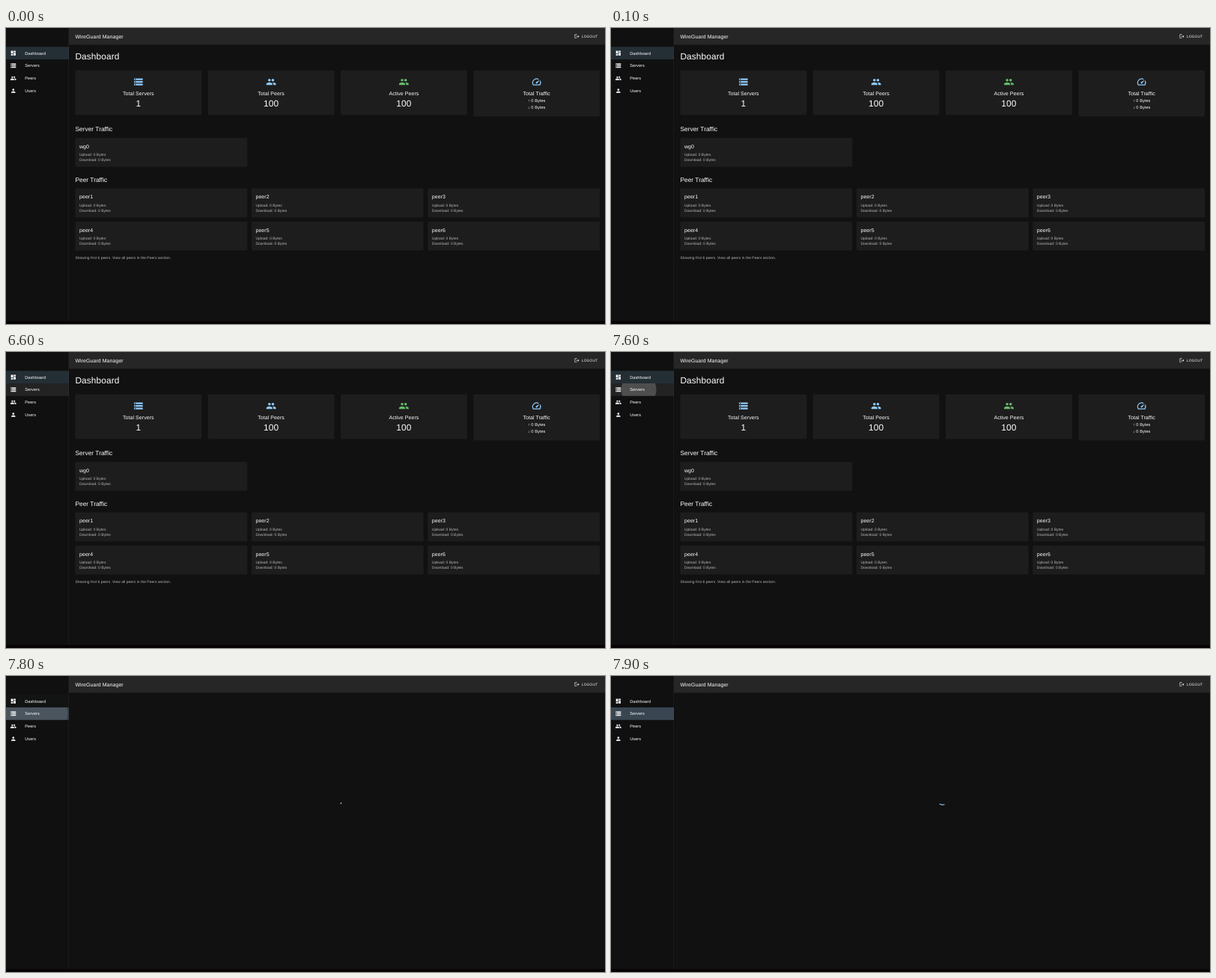
Animation, 800 px wide and 396 px high, one loop 8 s. Source, as an HTML page:

```html
<!DOCTYPE html>
<html lang="en">
<head>
<meta charset="utf-8">
<title>WireGuard Manager</title>
<style>
  html, body { margin: 0; width: 100%; height: 100%; overflow: hidden; background: #111; }
  svg { display: block; width: 800px; height: 396px; }
  text { font-family: "Liberation Sans", Arial, sans-serif; fill: #fff; white-space: pre; text-rendering: geometricPrecision; }
</style>
</head>
<body>
<svg id="stage" viewBox="0 0 800 396" xmlns="http://www.w3.org/2000/svg"></svg>
<script>
const NS = 'http://www.w3.org/2000/svg';
const LOOP = 8000, STEP = 100;
const BLUE = '#90caf9', GREEN = '#66bb6a';
const LEFT = 264, WIDTH = 2002;

const ICONS = {
  dashboard: 'M3 13h8V3H3v10zm0 8h8v-6H3v6zm10 0h8V11h-8v10zm0-18v6h8V3h-8z',
  storage: 'M2 20h20v-4H2v4zm2-3h2v2H4v-2zM2 4v4h20V4H2zm4 3H4V5h2v2zm-4 7h20v-4H2v4zm2-3h2v2H4v-2z',
  people: 'M16 11c1.66 0 2.99-1.34 2.99-3S17.66 5 16 5c-1.66 0-3 1.34-3 3s1.34 3 3 3zm-8 0c1.66 0 2.99-1.34 2.99-3S9.66 5 8 5C6.34 5 5 6.34 5 8s1.34 3 3 3zm0 2c-2.33 0-7 1.17-7 3.5V19h14v-2.5c0-2.33-4.67-3.5-7-3.5zm8 0c-.29 0-.62.02-.97.05 1.16.84 1.97 1.97 1.97 3.45V19h6v-2.5c0-2.33-4.67-3.5-7-3.5z',
  person: 'M12 12c2.21 0 4-1.79 4-4s-1.79-4-4-4-4 1.79-4 4 1.79 4 4 4zm0 2c-2.67 0-8 1.34-8 4v2h16v-2c0-2.66-5.33-4-8-4z',
  speed: 'm20.38 8.57-1.23 1.85a8 8 0 0 1-.22 7.58H5.07A8 8 0 0 1 15.58 6.85l1.85-1.23A10 10 0 0 0 3.35 19a2 2 0 0 0 1.72 1h13.85a2 2 0 0 0 1.74-1 10 10 0 0 0-.27-10.44zm-9.79 6.84a2 2 0 0 0 2.83 0l5.66-8.49-8.49 5.66a2 2 0 0 0 0 2.83z',
  logout: 'm17 7-1.41 1.41L18.17 11H8v2h10.17l-2.58 2.58L17 17l5-5zM4 5h8V3H4c-1.1 0-2 .9-2 2v14c0 1.1.9 2 2 2h8v-2H4z'
};

// font size and letter spacing (em)
const STYLES = {
  h4: [34, .00735], h5: [24, 0], h6: [20, .0075],
  body1: [16, .00938], body2: [14, .01071], button: [14, .02857]
};

function el(parent, tag, attrs) {
  const node = document.createElementNS(NS, tag);
  for (const key in attrs) node.setAttribute(key, attrs[key]);
  return parent.appendChild(node);
}
const rect = (parent, x, y, width, height, fill, rx = 0) =>
  el(parent, 'rect', { x, y, width, height, fill, rx });

// y is the middle of the text line
function text(parent, str, x, y, style, anchor = 'start', opacity = 1) {
  const [size, spacing] = STYLES[style];
  el(parent, 'text', {
    x, y: y + size * .3465, 'font-size': size, 'letter-spacing': size * spacing,
    'text-anchor': anchor, 'fill-opacity': opacity
  }).textContent = str;
}
function icon(parent, name, x, y, size, fill) {
  el(parent, 'path', { d: ICONS[name], fill, transform: `translate(${x} ${y}) scale(${size / 24})` });
}

const svg = document.getElementById('stage');
rect(svg, 0, 0, 800, 396, '#111');
const page = el(svg, 'g', { transform: 'scale(.35)' });

// top bar
rect(page, 240, 0, 2060, 64, '#262626');
text(page, 'WireGuard Manager', 264, 32, 'h6');
icon(page, 'logout', 2168.5, 22, 20, '#fff');
text(page, 'LOGOUT', 2196.5, 32, 'button');

// sidebar
rect(page, 0, 0, 240, 1132, '#101010');
rect(page, 239, 0, 1, 1132, 'rgba(255,255,255,.12)');
const clip = el(el(svg, 'defs', {}), 'clipPath', { id: 'row' });
rect(clip, 0, 120, 240, 48, '#fff');
const MENU = [['Dashboard', 'dashboard'], ['Servers', 'storage'], ['Peers', 'people'], ['Users', 'person']];
const rows = MENU.map(([label, name], i) => {
  const y = 72 + 48 * i;
  const back = rect(page, 0, y, 240, 48, 'none');
  icon(page, name, 16, y + 12, 24, '#fff');
  text(page, label, 72, y + 24, 'body1');
  return back;
});
const rippleBox = el(page, 'g', { 'clip-path': 'url(#row)' });
const ripple = el(rippleBox, 'circle', { cx: 106, cy: 144, fill: '#fff' });
rows[1].after(rippleBox);

// dashboard content
const main = el(page, 'g', {});
text(main, 'Dashboard', LEFT, 109, 'h4');

const statPitch = (WIDTH + 24) / 4, statWidth = statPitch - 24;
[
  ['storage', BLUE, 'Total Servers', '1'],
  ['people', BLUE, 'Total Peers', '100'],
  ['people', GREEN, 'Active Peers', '100'],
  ['speed', BLUE, 'Total Traffic', null]
].forEach(([name, color, label, value], i) => {
  const x = LEFT + i * statPitch, mid = x + statWidth / 2;
  rect(main, x, 162, statWidth, value ? 170 : 176, '#1d1d1d', 4);
  icon(main, name, mid - 20, 186, 40, color);
  text(main, label, mid, 250, 'h6', 'middle');
  if (value) text(main, value, mid, 287, 'h4', 'middle');
  else ['↑', '↓'].forEach((arrow, n) => text(main, arrow + ' 0 Bytes', mid, 278 + 24 * n, 'body1', 'middle'));
});

const cardPitch = (WIDTH + 16) / 3;
function trafficCard(name, col, y) {
  const x = LEFT + col * cardPitch;
  rect(main, x, y, cardPitch - 16, 111, '#1d1d1d', 4);
  text(main, name, x + 16, y + 32, 'h6');
  text(main, 'Upload: 0 Bytes', x + 16, y + 65, 'body2', 'start', .7);
  text(main, 'Download: 0 Bytes', x + 16, y + 85, 'body2', 'start', .7);
}
text(main, 'Server Traffic', LEFT, 386, 'h5');
trafficCard('wg0', 0, 420);
text(main, 'Peer Traffic', LEFT, 579, 'h5');
for (let i = 0; i < 6; i++) trafficCard('peer' + (i + 1), i % 3, 613 + 127 * Math.floor(i / 3));
text(main, 'Showing first 6 peers. View all peers in the Peers section.', LEFT, 877, 'body2', 'start', .7);

// loading spinner
const spinner = el(page, 'circle', {
  r: 20.2, fill: 'none', stroke: BLUE, 'stroke-width': 3.6
});

rect(svg, 0, 392, 800, 4, '#080305');

function bezier(x1, y1, x2, y2) {
  const at = (a, b, s) => 3 * a * s * (1 - s) ** 2 + 3 * b * s * s * (1 - s) + s ** 3;
  return x => {
    if (x <= 0) return 0;
    if (x >= 1) return 1;
    let lo = 0, hi = 1;
    for (let i = 0; i < 24; i++) {
      const s = (lo + hi) / 2;
      if (at(x1, x2, s) < x) lo = s; else hi = s;
    }
    return at(y1, y2, lo);
  };
}
const standard = bezier(.4, 0, .2, 1);
const easeInOut = bezier(.42, 0, .58, 1);

const PRESS = 7410, RELEASE = 7600, SWITCH = 7700, SPIN = 7680;
const white = a => `rgba(255,255,255,${a})`;
const blue = a => `rgba(144,202,249,${a})`;

function draw(t) {
  const loading = t >= SWITCH;
  main.setAttribute('display', loading ? 'none' : 'inline');

  // menu backgrounds
  const k = standard((t - SWITCH) / 150);
  rows[0].setAttribute('fill', blue(.16 * (1 - k)));
  rows[1].setAttribute('fill', t < 6600 ? 'none'
    : `rgba(${255 - 111 * k},${255 - 53 * k},${255 - 6 * k},${.08 + .16 * k})`);
  rows[2].setAttribute('fill', t >= 6500 && t < 6600 ? white(.05) : 'none');

  // click ripple
  const grow = standard((t - PRESS) / 550);
  const fade = 1 - standard((t - RELEASE) / 550);
  ripple.setAttribute('r', 137 * grow);
  ripple.setAttribute('fill-opacity', t >= 7500 ? (.1 + .2 * grow) * fade : 0);

  // spinner arc grows while it turns
  spinner.setAttribute('display', loading ? 'inline' : 'none');
  const age = Math.max(0, t - SPIN), p = easeInOut(age / 700);
  spinner.setAttribute('stroke-dasharray', `${1 + 99 * p} 200`);
  spinner.setAttribute('stroke-dashoffset', -15 * p);
  spinner.setAttribute('transform', `translate(1265 474) rotate(${age / 1400 * 360}) scale(${40 / 44})`);
}

const start = performance.now();
function tick() {
  const t = (performance.now() - start) % LOOP;
  draw(Math.floor(t / STEP) * STEP);
  requestAnimationFrame(tick);
}
draw(0);
requestAnimationFrame(tick);
</script>
</body>
</html>
```
